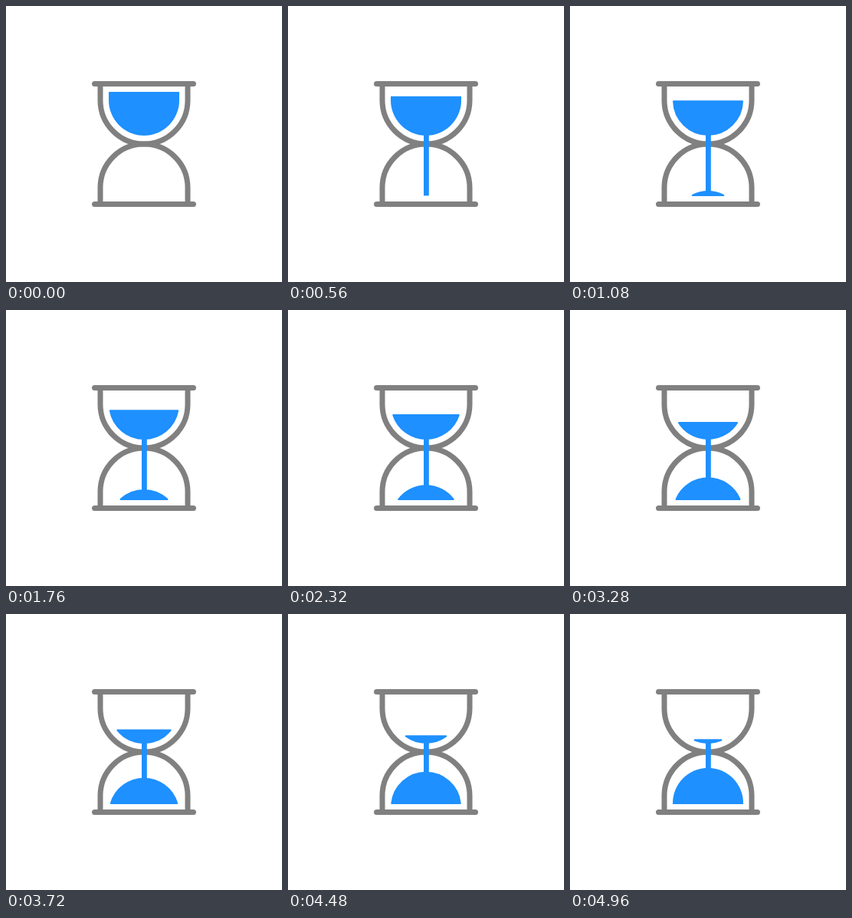
An HTML page that plays this animation: 360x360 px, repeating every 5 s.

```html
<!DOCTYPE html>
<html lang="en">
<head>
<meta charset="utf-8">
<title>Hourglass</title>
<style>
  html, body { margin: 0; width: 100%; height: 100%; overflow: hidden; background: #fff; }
  svg { display: block; width: 100%; height: 100%; }
</style>
</head>
<body>
<svg viewBox="0 0 360 360">
  <g fill="none" stroke="#808080" stroke-width="7">
    <path d="M115.5 101.5H244.5M115.5 258.5H244.5" stroke-linecap="round"/>
    <path d="M123 101.5V123A57 57 0 0 0 237 123V101.5"/>
    <path d="M123 258.5V237A57 57 0 0 1 237 237V258.5"/>
  </g>
  <g fill="#1e90ff" stroke="#1e90ff" stroke-linejoin="round">
    <rect id="stream" x="177" y="167" width="6.8" stroke="none"/>
    <path id="upper"/>
    <path id="lower"/>
  </g>
</svg>
<script>
const LOOP = 5000, STEP = 40;
const CX = 180, R = 46, FLOOR = 248, SPEED = 10.35;
const [stream, upper, lower] = ["stream", "upper", "lower"].map(id => document.getElementById(id));

// Round bowl cut by a flat edge; dir is 1 when the bowl bulges downwards.
function bowl(el, cy, flat, dir) {
  const depth = (flat - cy) * dir;
  const soft = depth > 0 ? 1.1 : 0;
  const r = R - soft, y = flat + soft * dir, d = (y - cy) * dir;
  const sweep = dir > 0 ? 0 : 1;
  if (R - depth <= 2 * soft) {
    el.setAttribute("d", "");
    return;
  }
  const half = d > 0 ? Math.sqrt(r * r - d * d) : r;
  const start = d > 0 ? y : cy;
  el.setAttribute("d",
    `M${CX - half} ${y}V${start}A${r} ${r} 0 0 ${sweep} ${CX + half} ${start}V${y}Z`);
  el.setAttribute("stroke-width", 2 * soft);
}

function draw(ms) {
  const s = ms / 1000;
  const peak = 252.2 - SPEED * s;
  bowl(upper, 123, 112 + SPEED * s, 1);
  bowl(lower, peak + R, FLOOR, -1);
  const tip = Math.min(167 + 200 * s, FLOOR, peak + 1);
  stream.setAttribute("height", s ? tip - 167 : 0);
}

const begin = performance.now();
function tick() {
  const ms = (performance.now() - begin) % LOOP;
  draw(Math.floor(ms / STEP) * STEP);
  requestAnimationFrame(tick);
}
draw(0);
requestAnimationFrame(tick);
</script>
</body>
</html>
```
